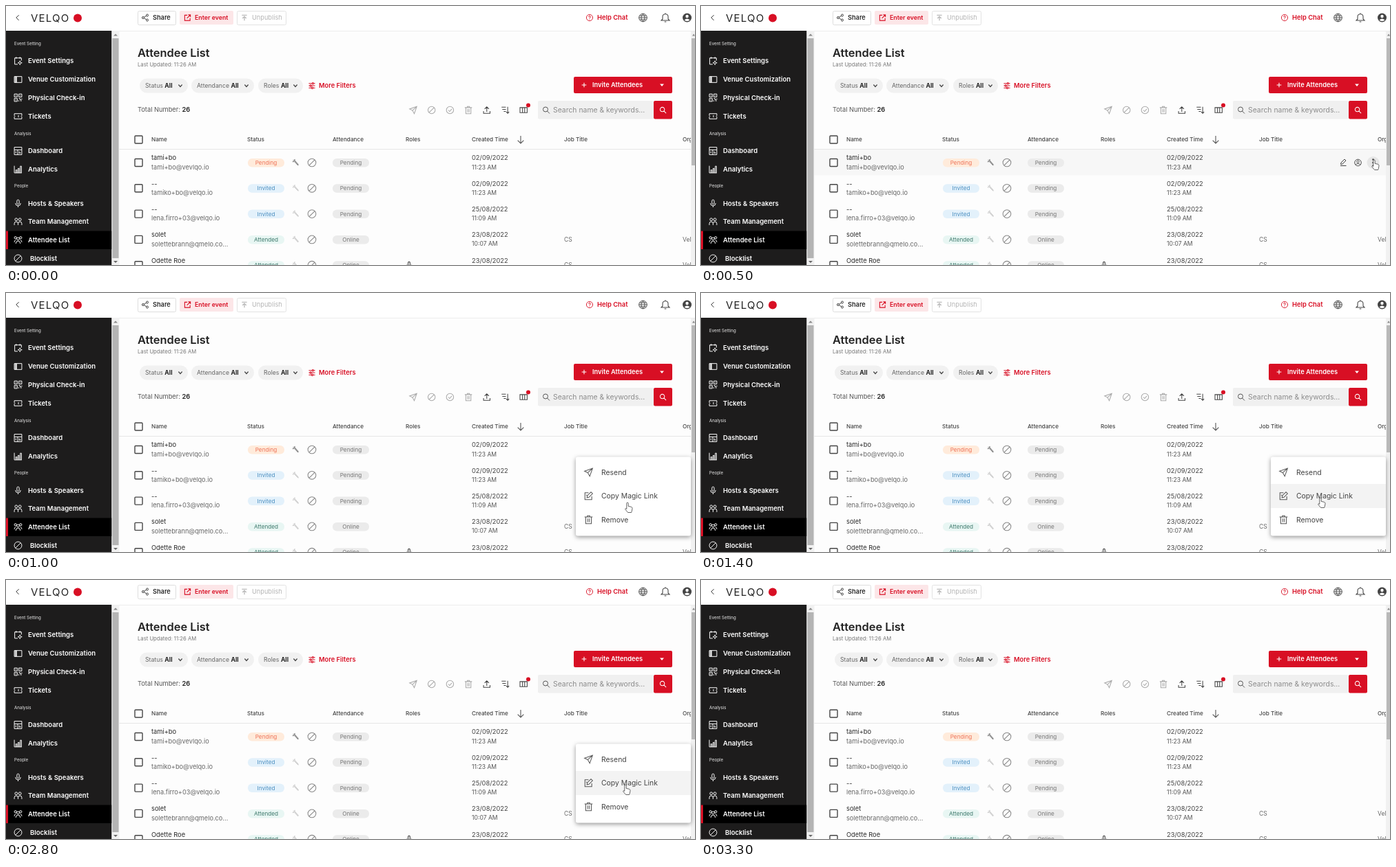
An HTML page that plays this animation: 1000x377 px, repeating every 3500 ms.

```html
<!DOCTYPE html>
<html lang="en">
<head>
<meta charset="utf-8">
<title>Attendee list</title>
<style>
  html, body { margin: 0; height: 100%; overflow: hidden; background: #fdfdfd; }
  svg { display: block; width: 100vw; height: 100vh; }
  text { font-family: Inter, "Open Sans", sans-serif; white-space: pre; }
</style>
</head>
<body>
<svg id="stage" viewBox="0 0 1000 377"></svg>
<script>
const RED = '#d80f24', DARK = '#2a2a2a', GREY = '#777';

const ring = (x, y, r) => `M${x - r} ${y}a${r} ${r} 0 1 0 ${2 * r} 0a${r} ${r} 0 1 0 ${-2 * r} 0`;
const box = (x, y, w, h = w) => `M${x} ${y}h${w}v${h}h${-w}z`;

// Icons on a 24 unit grid
const ICONS = {
  back: 'M15 5l-7 7 7 7',
  down: 'M5 8l7 8 7-8',
  share: ring(18, 5, 3) + ring(6, 12, 3) + ring(18, 19, 3) + 'M9 10.500l6.500-4M9 13.500l6.500 4',
  enter: 'M11 4H3v17h17v-8M14 3h7v7M21 3L10 14',
  publish: 'M4 4h16M12 21V9M6 14l6-6 6 6',
  help: ring(12, 12, 10) + 'M9 9.500q0-3 3-3t3 2.800q0 2-3 3.400v1.800M12 17v1.500',
  globe: ring(12, 12, 10) + 'M2 12h20M12 2q-9 10 0 20M12 2q9 10 0 20M4 7h16M4 17h16',
  bell: 'M3 18h18l-3-3V10q0-6-6-6t-6 6v5zM10 21h4M12 2v2',
  user: ring(12, 12, 10) + ring(12, 9, 3.5) + 'M5 19q2-4 7-4t7 4',
  settings: 'M11 21H3V4h18v7M7 1v5M17 1v5' + ring(17, 17, 3) + 'M17 11v3M17 20v3M11 17h3M20 17h3',
  venue: box(2, 4, 20, 16) + 'M4 4v16M6 4v16M8 4v16',
  checkin: box(2, 2, 8) + box(14, 2, 8) + box(2, 14, 8) + 'M6 5v2M18 5v2M6 17v2M14 14h3v3h3v5M22 14v3M14 19v3',
  ticket: 'M2 5h20v5q-3 2 0 4v5H2v-5q3-2 0-4zM13 9v6',
  dashboard: box(2, 2, 20) + 'M2 9h20M11 9v13M15 13v6M18 15v4M6 13v5',
  analytics: 'M2 3v19h20M6 22v-8h3v8M12 22V10h3v12M18 22V4h3v18',
  mic: 'M9 5q0-3 3-3t3 3v6q0 3-3 3t-3-3zM5 11q0 7 7 7t7-7M12 18v4',
  people: ring(7, 6, 3.5) + ring(17, 6, 3.5) + 'M2 21v-4q0-5 5-5t5 5v4M12 17q0-5 5-5t5 5v4',
  group: ring(12, 9, 3.5) + 'M6 22q0-7 6-7t6 7M6 12q-4 1-4 6M18 12q4 1 4 6' + ring(5, 6, 3) + ring(19, 6, 3),
  ban: ring(12, 12, 10) + 'M5 19L19 5',
  filters: 'M2 5h11M18 5h4M2 12h4M11 12h11M2 19h9M16 19h6' + ring(15, 5, 2.5) + ring(8, 12, 2.5) + ring(13, 19, 2.5),
  send: 'M22 2L2 9l8 4 5 9zM10 13L22 2',
  check: ring(12, 12, 10) + 'M7 12l4 4 6-7',
  trash: 'M2 5h20M5 5v17h14V5M9 5V2h6v3M10 9v9M14 9v9',
  upload: 'M3 15v6h18v-6M12 17V3M6 9l6-6 6 6',
  sort: 'M2 4h12M4 10h10M8 16h6M19 3v18M15 17l4 4 4-4',
  columns: box(2, 5, 20, 14) + 'M9 5v14M15 5v14',
  search: ring(10, 10, 7) + 'M15 15l7 7',
  arrow: 'M12 2v20M4 14l8 8 8-8',
  plus: 'M12 4v16M4 12h16',
  wand: 'M5 4l16 17M8 3l14 16M3 9h4M10 1v3',
  edit: 'M4 21h17M5 17l1-5L16 2l4 4L10 16z',
  magic: 'M12 4H3v17h17v-8M8 16l1-5 9-9 4 4-9 9zM6 9l2 2'
};

const icon = (name, x, y, size = 13, color = DARK, weight = 1.8) =>
  `<path d="${ICONS[name]}" transform="translate(${x - size / 2} ${y - size / 2}) scale(${size / 24})" fill="none" stroke="${color}" stroke-width="${weight}"/>`;
const rect = (x, y, w, h, fill, extra = '') =>
  `<rect x="${x}" y="${y}" width="${w}" height="${h}" fill="${fill}" ${extra}/>`;
const dot = (x, y, r, fill) => `<circle cx="${x}" cy="${y}" r="${r}" fill="${fill}"/>`;
// y is the middle of the capitals
const text = (x, y, words, size, fill = DARK, weight = 400, extra = '') =>
  `<text x="${x}" y="${y + size * .36}" font-size="${size}" fill="${fill}" font-weight="${weight}" ${extra}>${words}</text>`;
const pill = (x, y, words, fill, color) =>
  rect(x, y - 6, 53, 12.5, fill, 'rx="6"') + text(x + 26.5, y, words, 8.2, color, 400, 'text-anchor="middle"');

function header() {
  return rect(0, 0, 1000, 36, '#fff') + rect(164, 36, 836, 1, '#ececec') +
    icon('back', 17, 17, 13) +
    text(36, 17.5, 'VELQO', 15, '#222', 400, 'letter-spacing="1.2"') + dot(104, 17.5, 6, RED) +
    rect(191.5, 7.5, 55, 20, '#fff', 'rx="2" stroke="#ddd"') + icon('share', 202, 17, 12) + text(213, 17, 'Share', 9.2, DARK, 600) +
    rect(252, 7, 78, 20, '#fce6e8', 'rx="2"') + icon('enter', 263.5, 17, 11, RED, 2.4) + text(274, 17, 'Enter event', 8.8, RED, 600) +
    rect(335.5, 7.5, 71, 20, '#fff', 'rx="2" stroke="#e2e2e2"') + icon('publish', 346, 17, 11, '#bbb', 3) + text(357, 17, 'Unpublish', 9.2, '#b5b5b5') +
    icon('help', 847, 17, 11, RED, 2) + text(858, 17, 'Help Chat', 9.4, RED, 600) +
    icon('globe', 924.5, 17, 14, '#444', 1.6) + icon('bell', 957, 17, 16, '#444', 1.6) +
    dot(988.5, 17, 6.5, '#444') + dot(988.5, 15, 2.2, '#fff') + '<path d="M984.500 20.500q4-4 8 0q-4 3-8 0" fill="#fff"/>';
}

function sidebar() {
  const items = [
    ['settings', 'Event Settings', 80], ['venue', 'Venue Customization', 107], ['checkin', 'Physical Check-in', 133.5],
    ['ticket', 'Tickets', 160.5], ['dashboard', 'Dashboard', 211], ['analytics', 'Analytics', 237.5],
    ['mic', 'Hosts &amp; Speakers', 287.5], ['people', 'Team Management', 314], ['group', 'Attendee List', 340.5], ['ban', 'Blocklist', 367.5]
  ];
  const titles = [['Event Setting', 55], ['Analysis', 185.5], ['People', 262]];
  return rect(0, 36, 153.5, 341, '#1d1c1c') + rect(0, 327.5, 153.5, 26.5, '#000') + rect(0, 327.5, 3, 26.5, RED) +
    titles.map(([words, y]) => text(12, y, words, 6.2, '#eee')).join('') +
    items.map(([name, words, y]) => icon(name, 17.5, y, 13, '#fff') +
      text(name == 'ban' ? 35 : 32, y, words, 9.5, '#fff', 600)).join('') +
    rect(153.5, 36, 11, 341, '#f1f1f1') + rect(154.5, 47, 9, 320, '#b4b4b4') +
    '<path d="M156 43.500l3-3 3 3z" fill="#888"/><path d="M156 371l3 3 3-3z" fill="#666"/>';
}

function toolbar() {
  const filters = [[194, 70, 'Status'], [269, 91, 'Attendance'], [366, 65, 'Roles']];
  const tools = ['send', 'ban', 'check', 'trash', 'upload', 'sort', 'columns'];
  return text(191, 68, 'Attendee List', 16.4, '#222', 600) +
    text(191, 85, 'Last Updated: 11:26 AM', 7.7, GREY) +
    filters.map(([x, w, words]) => rect(x, 105.5, w, 21, '#f1f1f1', 'rx="10.5"') +
      text(x + 8, 116, `${words} <tspan font-weight="700" fill="#222">All</tspan>`, 8.7, '#666') +
      icon('down', x + w - 11, 116, 9, '#444', 3.2)).join('') +
    icon('filters', 444, 116, 11, RED, 2.4) + text(454, 116, 'More Filters', 9.3, RED, 600) +
    rect(824, 103, 143, 24, RED, 'rx="2"') + icon('plus', 839, 115, 10, '#fff', 2.6) +
    text(851, 115, 'Invite Attendees', 9.3, '#fff', 600) + '<path d="M949 113.500h6l-3 3.500z" fill="#fff"/>' +
    text(191, 151, 'Total Number: <tspan font-weight="600" fill="#222">26</tspan>', 9.3, '#555') +
    tools.map((name, i) => icon(name, 591 + i * 26.7, 151.5, 12.5, i < 4 ? '#aaa' : '#444', 2)).join('') +
    dot(758, 144.5, 3, RED) +
    rect(772, 138, 168, 26.5, '#f0f0f0', 'rx="2"') + icon('search', 784, 151.5, 12, '#555', 2) +
    text(794, 151.5, 'Search name &amp; keywords...', 10.4, '#8c8c8c') +
    rect(940, 138, 27, 26.5, RED, 'rx="2"') + icon('search', 953.5, 151.5, 11, '#fff', 2.2);
}

function table() {
  const heads = [[211, 'Name'], [350, 'Status'], [474, 'Attendance'], [580, 'Roles'], [676, 'Created Time'], [810, 'Job Title'], [982, 'Organization']];
  const rows = [
    ['tami+bo', 'tami+bo@vevlqo.io', 'Pending', '02/09/2022', '11:23 AM'],
    ['--', 'tamiko+bo@velqo.io', 'Invited', '02/09/2022', '11:23 AM'],
    ['--', 'lena.firro+03@velqo.io', 'Invited', '25/08/2022', '11:09 AM'],
    ['solet', 'solettebrann@qmelo.co...', 'Attended', '23/08/2022', '10:07 AM'],
    ['Odette Roe', '', 'Attended', '23/08/2022', '']
  ];
  const looks = { Pending: ['#ffebdb', '#ee7358'], Invited: ['#e3f1fb', '#4c8fc0'], Attended: ['#e8f6f3', '#3f7a6d'] };
  const checkbox = y => rect(187, y - 5.5, 11, 11, '#fff', 'rx="1" stroke="#444" stroke-width="1.4"');
  const row = ([name, mail, status, date, time], i) => {
    const y = 228 + i * 37.3, attended = status == 'Attended';
    return checkbox(y) + text(211, y - 7, name, 9.3) + text(211, y + 6.5, mail, 9.2, '#666') +
      pill(351, y, status, ...looks[status]) +
      icon('wand', 420, y, 11, i ? '#bbb' : '#555', 2) + icon('ban', 444, y, 14, '#888', 1.8) +
      pill(474, y, attended ? 'Online' : 'Pending', '#ebebeb', GREY) +
      text(676, y - 7, date, 9.3, '#444') + text(676, y + 6.5, time, 8.6, '#555') +
      (attended ? text(810, y, 'CS', 8.6, '#666') + text(982, y, 'Velqo', 8.6, '#666') : '');
  };
  return checkbox(194.5) + heads.map(([x, words]) => text(x, 194.5, words, 8.2, '#444', 500)).join('') +
    icon('arrow', 747, 194.5, 13, '#555', 2) + rect(164, 208, 830, 1, '#e6e6e6') +
    rows.map(row).join('') + icon('mic', 585, 377, 11, '#444', 2.4);
}

function menu() {
  const items = [['send', 'Resend', 261], ['magic', 'Copy Magic Link', 295.5], ['trash', 'Remove', 330]];
  return rect(827, 238.5, 167, 115, '#fff', 'rx="3" style="filter:drop-shadow(0 2px 3px #0006)"') +
    rect(827, 278, 167, 35, '#f3f3f3', 'id="lit"') +
    items.map(([name, words, y]) => icon(name, 845.5, y, 14, '#555') + text(864, y, words, 10.4, '#444')).join('');
}

const stage = document.getElementById('stage');
stage.innerHTML = rect(0, 0, 1000, 377, '#fdfdfd') +
  rect(164, 209, 830, 37.5, '#f7f7f7', 'id="rowLit"') + toolbar() + table() +
  '<g id="rowTools">' + dot(975.5, 228, 9, '#e6e6e6') + icon('edit', 932, 228, 12, '#444', 2) + icon('user', 953.5, 228, 11.5, '#444', 2) +
  [223.5, 228, 232.5].map(y => dot(975.5, y, 1.3, '#444')).join('') + '</g>' +
  rect(994, 36, 6, 341, '#f1f1f1') + rect(995, 47, 5, 185, '#b9b9b9') + '<path d="M996 43.500l2-3 2 3z" fill="#888"/>' +
  sidebar() + header() + `<g id="menu">${menu()}</g>` +
  '<path id="cursor" fill="#fff" stroke="#555" stroke-width=".9" d="M-2-7q1.200 0 1.200 1.200v4.200l4 .8q2 .5 1.800 2.500l-.6 3.500-.8 2.300h-5l-3.500-4.200q-1-1.500.6-1.800l1.100.9v-8.200q0-1.200 1.200-1.200z"/>';

const [rowLit, rowTools, menuBox, lit, cursor] =
  ['rowLit', 'rowTools', 'menu', 'lit', 'cursor'].map(id => document.getElementById(id));
const show = (node, on) => node.setAttribute('visibility', on ? 'visible' : 'hidden');

// Cursor runs: [tick, x, y] points in tenths of a second, hidden between runs
const runs = [
  { end: 23, points: [[3, 990, 240], [5, 979, 231], [8, 979, 231], [10, 904, 312], [14, 901, 305]] },
  { end: 33, points: [[28, 901, 305], [30, 897.5, 306]] }
];

function cursorAt(tick) {
  const run = runs.find(({ end, points }) => tick >= points[0][0] && tick < end);
  if (!run) return null;
  const next = run.points.findIndex(p => p[0] > tick);
  if (next < 0) return run.points.at(-1).slice(1);
  const [a, b] = [run.points[next - 1], run.points[next]];
  const k = (tick - a[0]) / (b[0] - a[0]);
  return [a[1] + (b[1] - a[1]) * k, a[2] + (b[2] - a[2]) * k];
}

function menuAt(tick) {
  if (tick < 9 || tick > 30) return [0, 1];
  if (tick == 9) return [.6, .92];
  return tick == 30 ? [.1, .84] : [1, 1];
}

function draw(now) {
  const tick = Math.floor(now % 3500 / 100);
  const spot = cursorAt(tick), [opacity, scale] = menuAt(tick);
  show(cursor, spot);
  if (spot) cursor.setAttribute('transform', `translate(${spot})`);
  const hover = tick >= 3 && tick < 9;
  show(rowLit, hover);
  show(rowTools, hover);
  menuBox.setAttribute('opacity', opacity);
  menuBox.setAttribute('transform', `translate(968 244) scale(${scale} ${scale * scale}) translate(-968 -244)`);
  show(lit, tick > 10 && tick < 30);
  requestAnimationFrame(draw);
}
requestAnimationFrame(draw);
</script>
</body>
</html>
```
